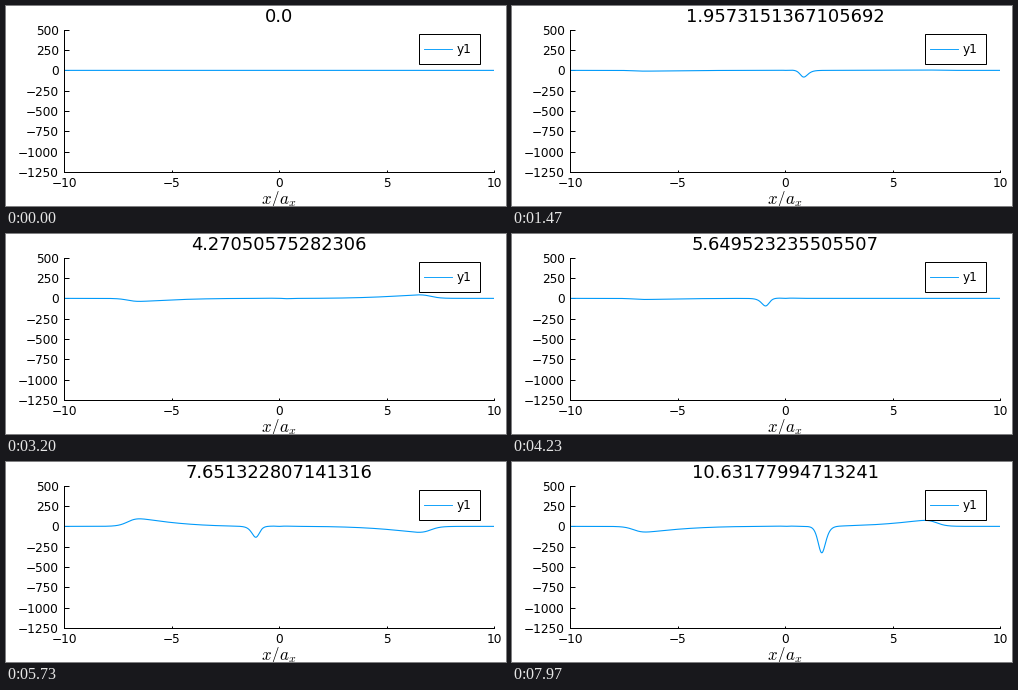
Write a matplotlib script that moves like this. It is 500 px wide and 200 px high and loops after 8 s.

```python
import math

import numpy as np
import matplotlib.pyplot as plt
from matplotlib.animation import FuncAnimation
from matplotlib.patches import Rectangle

W, H, DPI = 500, 200, 100
FRAMES, LOOP = 400, 8000
SPAN, STEPS = 8 * math.sqrt(2) * math.pi, 799
BLUE = "#009afa"
NU = 1 / math.sqrt(2)   # soliton frequency in units of the trap's
GROWTH = 0.09
X = np.linspace(-10, 10, 1025)

plt.rcParams.update({
    "font.family": "DejaVu Sans",
    "mathtext.fontset": "cm",
    "axes.unicode_minus": True,
})


def pt(px):
    return px * 72 / DPI


def swing(t):
    """Growing oscillation of the soliton."""
    return math.exp(GROWTH * t) * math.sin(NU * t)


def edge_heights(t):
    """Cloud driven by the soliton: delayed sloshing plus breathing."""
    s = max(t - 0.72, 0)
    slosh = -36.5 * (swing(s) - NU * math.sin(s))
    breath = 1.3 * t * math.cos(1.6 * (t - 7.6))
    return breath + slosh, breath - slosh


def ripple(u, height):
    """Cubic swell that is cut off smoothly at the cloud's rim."""
    u = np.clip(u, 0, None)
    return height * u ** 3 / 245 / (1 + np.exp((u - 6.98) / 0.22))


def notch(center):
    return 1 / np.cosh((X - center) / 0.24) ** 2


def curve(t):
    density = 122 * np.clip(1 - X ** 2 / 49, 0, None)
    left, right = edge_heights(t)
    return (X ** 2 * density * (notch(0) - notch(0.68 * swing(t)))
            + ripple(-X, left) + ripple(X, right))


def time_at(step):
    # Exact ratio, so that all digits of the title are right
    num, den = SPAN.as_integer_ratio()
    return num * step / (den * STEPS)


fig = plt.figure(figsize=(W / DPI, H / DPI), dpi=DPI, facecolor="white")
ax = fig.add_axes([58.4 / W, 1 - 165.8 / H, 429.6 / W, 142 / H])
ax.set_xlim(-10, 10)
ax.set_ylim(-1250, 500)
ax.set_xticks(range(-10, 11, 5))
ax.set_yticks(range(-1250, 501, 250))
ax.spines[["top", "right"]].set_visible(False)
ax.spines[["left", "bottom"]].set_linewidth(pt(1))
ax.tick_params(direction="in", width=pt(1), labelsize=pt(12.1))
ax.tick_params(axis="x", length=pt(2), pad=pt(5.5))
ax.tick_params(axis="y", length=pt(4.5), pad=pt(5.5))

line, = ax.plot(X, 0 * X, color=BLUE, lw=pt(1.1))


def label(x, y, text, size, **kw):
    return fig.text(x / W, 1 - y / H, text, fontsize=pt(size),
                    va="baseline", **kw)


title = label(273.2, 15.5, "0.0", 17.9, ha="center")
label(272.6, 198, r"$x/a_x$", 17, ha="center")

# Legend
fig.add_artist(Rectangle((413, H - 58), 61, 30, transform=None, fc="white",
                         ec="black", lw=pt(1), zorder=5))
fig.add_artist(plt.Line2D([418 / W, 446 / W], [1 - 43 / H] * 2,
                          color=BLUE, lw=pt(0.9), zorder=6))
label(450.5, 47.4, "y1", 12.1, ha="left", zorder=6)


def update(i):
    # Three time steps for every five ticks of the clock
    t = time_at((3 * i + 2) // 5)
    title.set_text(repr(t))
    line.set_ydata(curve(t))
    return line, title


anim = FuncAnimation(fig, update, frames=FRAMES, interval=LOOP // FRAMES,
                     init_func=lambda: update(0), repeat=True,
                     repeat_delay=0, blit=False)
plt.show()
```
